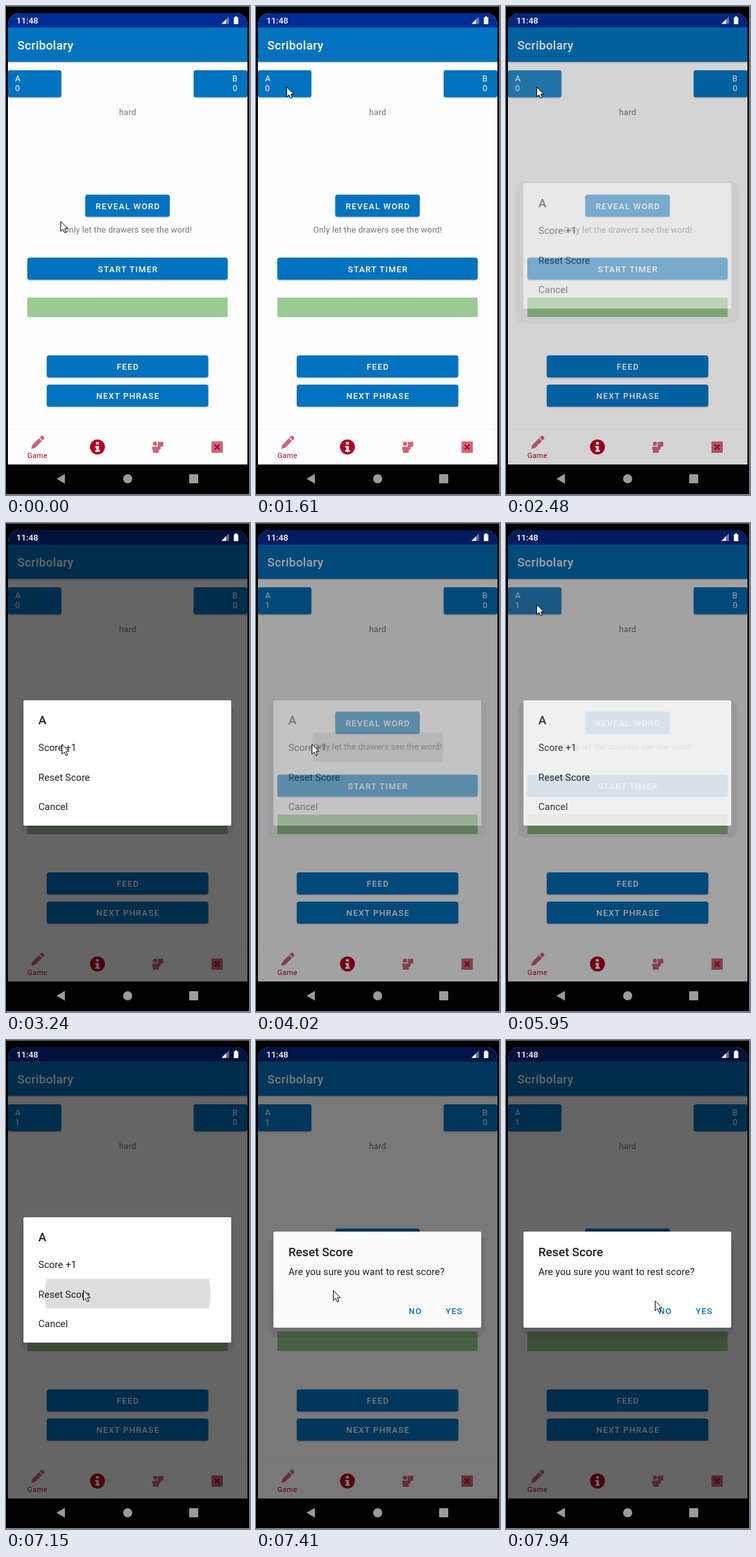
These frames come from a looping animation (377 by 753 pixels, 8 s). An HTML page:

```html
<!DOCTYPE html>
<html lang="en">
<head>
<meta charset="utf-8">
<title>Drawing game</title>
<style>
html, body { margin: 0; width: 100%; height: 100%; overflow: hidden; background: #000; }
svg { display: block; }
text { font: 12.9px Roboto, sans-serif; }
.mid { text-anchor: middle; }
.hint { fill: #757575; letter-spacing: .18px; }
.button { fill: #0072be; filter: drop-shadow(0 1px 1px #0004); }
.label { font-size: 13px; font-weight: 500; letter-spacing: 1.17px; fill: #fff; }
.score { font-size: 13px; fill: #fff; }
.title { font-size: 18.6px; font-weight: 500; fill: #212121; }
.row { font-size: 14.9px; fill: #212121; letter-spacing: .06px; }
.action { fill: #0072be; }
.faded { opacity: .6; }
.shadow { fill-opacity: .07; }
</style>
</head>
<body>
<svg width="377" height="753" viewBox="0 0 377 753">
  <defs>
    <clipPath id="screen"><path d="M3 706V29A18 18 0 0 1 21 11H355A18 18 0 0 1 373 29V706Z"/></clipPath>
    <clipPath id="rowClip"><rect id="rowBox" x="27" width="321" height="45.5"/></clipPath>
  </defs>
  <path d="M0 .5H377" stroke="#777"/>
  <path d="M376.5 0V753M0 752.5H377" stroke="#bbb"/>

  <g clip-path="url(#screen)">
    <path fill="#fdfdfd" d="M3 11H373V706H3Z"/>
    <path fill="#002c96" d="M3 11H373V34H3Z"/>
    <path class="button" d="M3 33H373V86H3Z"/>
    <text class="title" x="17.5" y="67" style="fill:#fff;letter-spacing:.3px">Scribolary</text>

    <rect class="button" x="3" y="99" width="82.5" height="41.5" rx="3"/>
    <rect id="press" x="3" y="99" width="82.5" height="41.5" rx="3" fill="#fff"/>
    <text class="score" x="14" y="116">A</text>
    <text class="score" id="score" x="14" y="131">0</text>
    <rect class="button" x="290" y="99" width="83" height="41.5" rx="3"/>
    <g text-anchor="end">
      <text class="score" x="357.5" y="116">B</text>
      <text class="score" x="357.5" y="131">0</text>
    </g>

    <text class="hint mid" x="188" y="168">hard</text>
    <text class="hint mid" x="188" y="348.5">Only let the drawers see the word!</text>
    <path fill="#9bca93" d="M33 449H342.5V479H33Z"/>
    <g id="buttons"></g>

    <path stroke="#000" stroke-opacity=".03" d="M3 651.5H373"/>
    <g fill="#b00020">
      <path class="faded" d="M39 682L40.5 676L51 665.5L55.5 670L45 680.5ZM52 664.5L54.5 662Q56 661 57.5 662.5L58.5 663.5Q60 665 59 666.5L56.5 669Z"/>
      <text class="mid" x="48.5" y="695.5" style="font-size:11.2px;letter-spacing:.4px">Game</text>
      <circle cx="141.3" cy="679" r="11.5"/>
      <path fill="#fff" d="M139 671.5h4.5v3.8H139ZM138 677.5h5.5v6.5h1.5v2.5h-7v-2.5h1.5v-4H138Z"/>
      <path class="faded" d="M227 674a3.2 3.2 0 1 1 6.4 0a3.2 3.2 0 1 1-6.4 0M226 678.5H234.5V671H237L238 672L240 670.5L243 671.5V678L239 679V682L236 684V688H227V684L226 683Z"/>
      <path class="faded" d="M317.5 670.5H335V688H317.5Z"/>
      <path stroke="#b00020" stroke-width="2.2" d="M322.5 675.5L330 683M330 675.5L322.5 683"/>
    </g>
    <path id="dim" d="M3 11H373V706H3Z"/>

    <g id="menu">
      <rect class="shadow" rx="13"/>
      <rect x="27" y="273" width="321" height="193" rx="2" fill="#fff"/>
      <circle id="ripple" cx="188" fill-opacity=".13" clip-path="url(#rowClip)"/>
      <text class="title" x="50" y="310">A</text>
      <text class="row" x="50" y="351">Score +1</text>
      <text class="row" x="50" y="396.5">Reset Score</text>
      <text class="row" x="50" y="441.5">Cancel</text>
    </g>
    <g id="confirm">
      <rect class="shadow" rx="13"/>
      <rect x="27" y="295" width="321" height="148" rx="2" fill="#fff"/>
      <text class="title" x="50" y="332.5">Reset Score</text>
      <text class="row" x="50" y="361.5">Are you sure you want to rest score?</text>
      <text class="label action" x="236" y="422">NO</text>
      <text class="label action" x="293" y="422">YES</text>
    </g>
  </g>

  <g fill="#fff">
    <text x="16" y="27" style="font-size:13.3px;font-weight:500">11:48</text>
    <path fill-opacity=".4" d="M333 27.5L344.5 16V27.5Z"/>
    <path d="M333 27.5L340 20.5V27.5Z"/>
    <path d="M352 17.5H354V16H357V17.5H359V28H352Z"/>
  </g>
  <g fill="#9b9b9b">
    <path d="M78 728L91 720.5V735.5Z"/>
    <circle cx="188" cy="728" r="7"/>
    <rect x="283" y="721" width="14" height="14" rx="1"/>
  </g>
  <path id="cursor" fill="#fff" stroke="#000" d="M.5 .8V16L4 12.7L6.5 18L9 17L6.7 11.8H11.3Z"/>
</svg>
<script>
const $ = id => document.getElementById(id);
const LOOP = 8000;
const TICK = 120;
const FADE = .6;  // share of a dialog fade done per tick

const addButton = (label, x, y, width) => $('buttons').innerHTML +=
  `<rect class="button" x="${x}" y="${y}" width="${width}" height="34" rx="3.5"/>
   <text class="label mid" x="188.5" y="${y + 22}">${label}</text>`;
addButton('REVEAL WORD', 122.5, 290.5, 130.5);
addButton('START TIMER', 33, 387.5, 309.5);
addButton('FEED', 63, 538, 249.5);
addButton('NEXT PHRASE', 63, 583, 249.5);

const moves = [
  { start: 1130, steps: 5, x: 47, y: 124 },
  { start: 2970, steps: 3, x: 86, y: 340 },
  { start: 4590, steps: 5, x: 47, y: 125 },
  { start: 6190, steps: 6, x: 119, y: 385 },
  { start: 7820, steps: 2, x: 230, y: 401 },
];
const visits = [
  { press: 2110, open: 2480, phase: .27, tap: 4020, close: 4020, row: 0, reach: 102 },
  { press: 5710, open: 5950, phase: .6, tap: 7150, close: 7270, row: 1, reach: 128 },
];
const confirmation = { open: 7270, phase: .27, close: Infinity };

const ticks = (t, from) => Math.floor((t - from) / TICK);
const easeOut = (p, power) => 1 - (1 - p) ** power;

function cursorAt(t) {
  let x = 84, y = 331;
  for (const move of moves.filter(m => m.start <= t)) {
    const p = easeOut(Math.min(1, (ticks(t, move.start) + 1) / move.steps), 3);
    x += (move.x - x) * p;
    y += (move.y - y) * p;
  }
  return [Math.round(x), Math.round(y)];
}

// Linear progress of a dialog and the opacity eased from it.
function fade(t, { open, phase, close }) {
  if (t < open) return { p: 0, opacity: 0 };
  if (t < close) {
    const p = Math.min(1, phase + FADE * ticks(t, open));
    return { p, opacity: easeOut(p, 2) };
  }
  const p = Math.max(0, FADE * (1 - ticks(t, close)));
  return { p, opacity: p * p };
}

function set(element, attributes) {
  for (const name in attributes) element.setAttribute(name, attributes[name]);
}

function showDialog(id, { p, opacity }, y, height) {
  const spread = 4 + 12 * (1 - p);
  set($(id), { opacity });
  set($(id).querySelector('.shadow'), {
    x: 27 - spread, y: y + 10 - spread, width: 321 + 2 * spread, height: height + 2 * spread,
  });
}

function draw(t) {
  const visit = visits.findLast(v => v.press <= t) ?? visits[0];
  const menu = fade(t, visit), confirm = fade(t, confirmation);
  const pressed = t >= visit.press && t < visit.open + TICK;
  const rowTop = 322.5 + 45.5 * visit.row;

  set($('cursor'), { transform: `translate(${cursorAt(t)})` });
  set($('press'), { opacity: pressed ? .08 * Math.min(2, ticks(t, visit.press) + 1) : 0 });
  set($('dim'), { opacity: .6 * Math.min(1, menu.p + confirm.p) });
  set($('rowBox'), { y: rowTop });
  set($('ripple'), { cy: rowTop + 22.75, r: t < visit.tap ? 0 : visit.reach });
  showDialog('menu', menu, 273, 193);
  showDialog('confirm', confirm, 295, 148);
  $('score').textContent = t < visits[0].close ? 0 : 1;
}

const start = performance.now();
function tick() {
  draw((performance.now() - start) % LOOP);
  requestAnimationFrame(tick);
}
tick();
</script>
</body>
</html>
```
